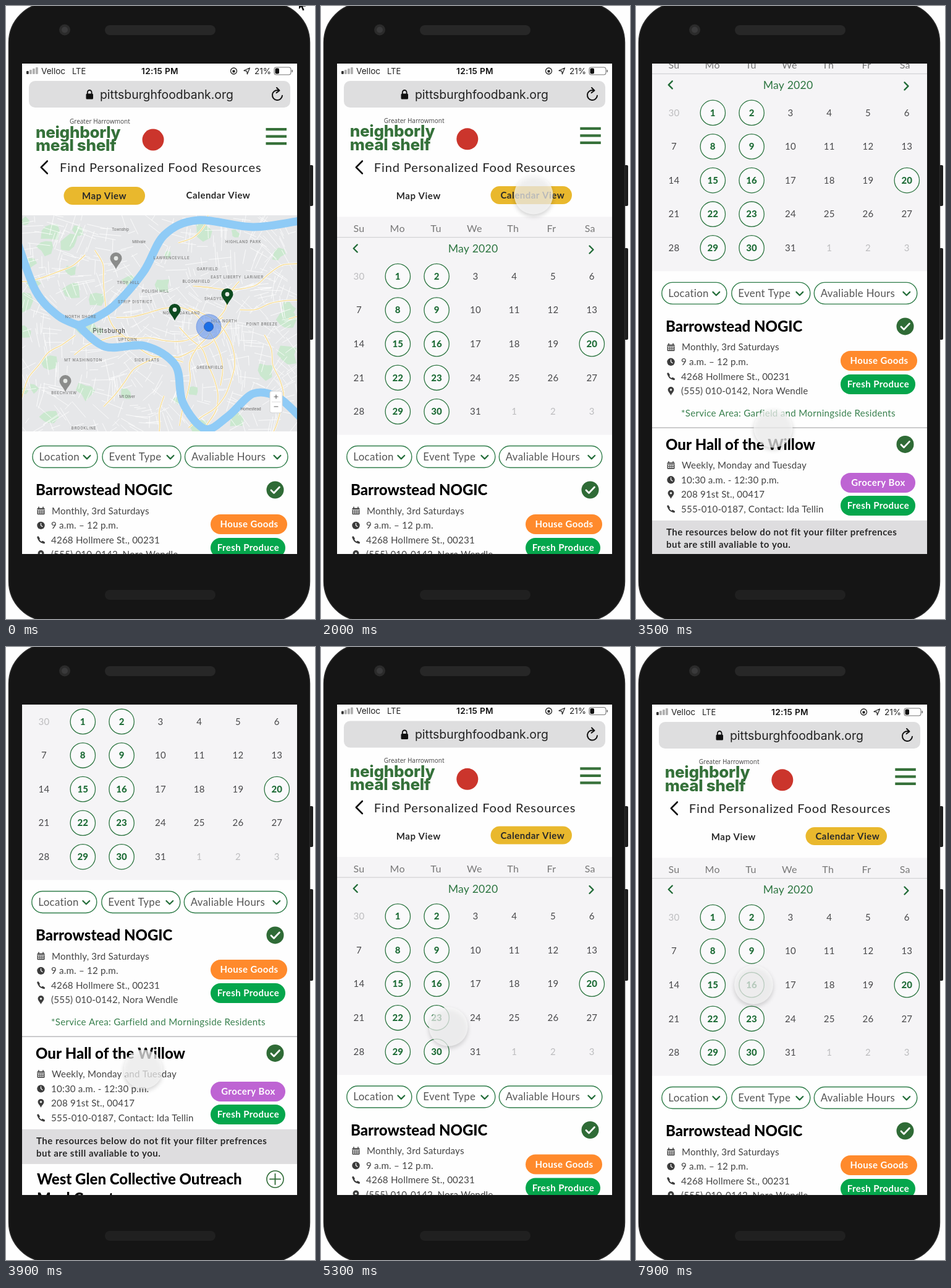
Write an HTML page with a canvas that moves like this. It is 500 by 990 pixels and loops after 8000 ms.

```html
<!DOCTYPE html>
<html lang="en">
<head>
<meta charset="utf-8">
<title>Food resources</title>
<style>
  html, body { margin: 0; width: 100%; height: 100%; overflow: hidden; background: #fff; }
  canvas { display: block; width: 500px; height: 990px; }
</style>
</head>
<body>
<canvas id="stage"></canvas>
<script>
const W = 500, H = 990, LOOP = 8000;
const LATO = 'Lato, "Open Sans", sans-serif', INTER = 'Inter, Roboto, sans-serif', MAP_FONT = 'Roboto, sans-serif';
const GREEN = '#2c7540', DARK = '#2f6b36', GOLD = '#e9b82d', INK = '#3c3c3c', FRESH = '#05a64c';
const dpr = window.devicePixelRatio || 1;

function prepare(canvas) {
  canvas.width = W * dpr;
  canvas.height = H * dpr;
  const ctx = canvas.getContext('2d');
  ctx.scale(dpr, dpr);
  return ctx;
}
const stageCtx = prepare(document.getElementById('stage'));
let c = stageCtx;

// ---------- helpers ----------
function text(s, x, y, size, o = {}) {
  c.font = `${o.w || 400} ${size}px ${o.f || LATO}`;
  c.letterSpacing = (o.ls || 0) + 'px';
  c.textAlign = o.a || 'left';
  c.fillStyle = o.c || '#333';
  c.fillText(s, x, y + size * 0.35);
}
function paint(fill, stroke, lw) {
  if (fill) { c.fillStyle = fill; c.fill(); }
  if (stroke) { c.strokeStyle = stroke; c.lineWidth = lw; c.stroke(); }
}
function box(x, y, w, h, r, fill, stroke, lw = 1.4) {
  c.beginPath();
  c.roundRect(x, y, w, h, r);
  paint(fill, stroke, lw);
}
function disc(x, y, r, fill, stroke, lw = 1.4) {
  c.beginPath();
  c.arc(x, y, r, 0, 7);
  paint(fill, stroke, lw);
}
function line(p, color, lw) {
  c.beginPath();
  for (let i = 0; i < p.length; i += 2) c.lineTo(p[i], p[i + 1]);
  c.lineCap = c.lineJoin = 'round';
  paint(null, color, lw);
}
function chevron(x, y, dx, dy, color, lw) {
  // tip at (x + dx, y + dy), arms at right angles to it
  line([x - dx - dy * 2, y - dy - dx * 2, x + dx, y + dy, x - dx + dy * 2, y - dy + dx * 2], color, lw);
}
function plus(x, y, r, color, lw) {
  line([x - r, y, x + r, y], color, lw);
  line([x, y - r, x, y + r], color, lw);
}
// smooth curve through every point
function spline(p, color, lw) {
  const n = p.length / 2, at = i => 2 * Math.max(0, Math.min(n - 1, i));
  c.beginPath();
  c.moveTo(p[0], p[1]);
  for (let i = 0; i < n - 1; i++) {
    const a = at(i - 1), b = at(i), d = at(i + 1), e = at(i + 2);
    c.bezierCurveTo(p[b] + (p[d] - p[a]) / 6, p[b + 1] + (p[d + 1] - p[a + 1]) / 6,
      p[d] - (p[e] - p[b]) / 6, p[d + 1] - (p[e + 1] - p[b + 1]) / 6, p[d], p[d + 1]);
  }
  paint(null, color, lw);
}
function random(seed) {
  return () => (seed = seed * 16807 % 2147483647) / 2147483647;
}
const clamp = u => Math.max(0, Math.min(1, u));
const phase = (t, from, to) => clamp((t - from) / (to - from));
const smooth = u => u * u * (3 - 2 * u);
const easeOut = u => 1 - (1 - u) * (1 - u);
const mix = (a, b, u) => a + (b - a) * u;

// ---------- map ----------
function pin(x, y, color, k = 1) {
  c.save();
  c.translate(x, y);
  c.scale(k, k);
  c.beginPath();
  c.moveTo(0, 14);
  c.bezierCurveTo(-3, 7, -9.5, 2, -9.5, -3.5);
  c.arc(0, -3.5, 9.5, Math.PI, 0);
  c.bezierCurveTo(9.5, 2, 3, 7, 0, 14);
  paint(color);
  disc(0, -3.5, 3.4, '#e6e9e6');
  c.restore();
}

function parks() {
  const rnd = random(41);
  for (let i = 0; i < 34; i++) {
    const x = 26 + 445 * rnd() ** 1.3, y = 338 + 349 * rnd(), r = 5 + 11 * rnd();
    c.beginPath();
    for (let a = 0; a < 6.2; a += 0.8) {
      const k = r * (0.6 + 0.7 * rnd());
      c.lineTo(x + Math.cos(a) * k, y + Math.sin(a) * k);
    }
    paint('#cbe8cf');
  }
}
function streets() {
  const rnd = random(17);
  c.beginPath();
  for (let i = 0; i < 620; i++) {
    const x = 26 + 445 * rnd(), y = 338 + 349 * rnd(), r = 5 + 14 * rnd();
    const a = Math.sin(x / 70) + Math.cos(y / 60) + (i % 2) * Math.PI / 2;
    c.moveTo(x - Math.cos(a) * r, y - Math.sin(a) * r);
    c.lineTo(x + Math.cos(a) * r, y + Math.sin(a) * r);
  }
  paint(null, 'rgba(255,255,255,.8)', 1);
}
function roads() {
  const rnd = random(23);
  for (let i = 0; i < 16; i++) {
    let x = 26 + 445 * rnd(), y = 338 + 349 * rnd(), a = 6.3 * rnd();
    const p = [];
    for (let k = 0; k < 11; k++) {
      p.push(x, y);
      a += rnd() - 0.5;
      x += 26 * Math.cos(a);
      y += 26 * Math.sin(a);
    }
    spline(p, '#fff', 3);
    spline(p, '#f6de9c', 1.6);
  }
}
const LABELS = [
  ['Township', 185, 361], ['Millvale', 215, 381], ['HIGHLAND PARK', 384, 381],
  ['LAWRENCEVILLE', 268, 407], ['GARFIELD', 326, 425], ['EAST LIBERTY  LARIMER', 374, 438],
  ['BLOOMFIELD', 308, 445], ['TROY HILL', 198, 447], ['POLISH HILL', 242, 461],
  ['STRIP DISTRICT', 209, 478], ['SHADYSIDE', 341, 473], ['NORTH OAKLAND', 284, 496],
  ['NORTH SHORE', 121, 502], ['UPTOWN', 197, 539], ['HILL NORTH', 353, 509],
  ['POINT BREEZE', 414, 514], ['MT WASHINGTON', 125, 572], ['SIDE FLATS', 228, 572],
  ['GREENFIELD', 330, 584], ['BEECHVIEW', 94, 625], ['Mt Oliver', 196, 631],
  ['BROOKLINE', 126, 682], ['Homestead', 396, 651]
];

function paintMap() {
  c.beginPath();
  c.rect(26, 338, 445, 349);
  c.clip();
  paint('#e6e7e9');
  parks();
  streets();
  roads();
  const water = '#8fcbf6';
  spline([480, 346, 400, 357, 310, 346, 256, 370, 222, 430, 170, 488, 118, 516], water, 13);
  spline([18, 380, 48, 460, 84, 500, 118, 516], water, 13);
  spline([114, 513, 160, 550, 225, 549, 274, 580, 286, 640, 322, 683, 360, 662, 400, 626, 440, 632, 480, 668], water, 13);
  for (const [s, x, y] of LABELS) {
    const caps = s === s.toUpperCase();
    text(s, x, y, 6.4, { f: MAP_FONT, a: 'center', ls: caps ? 0.7 : 0, c: '#6c6c6c' });
  }
  text('Pittsburgh', 167, 524, 10, { f: MAP_FONT, a: 'center', ls: 0.7, c: '#444' });
  pin(178, 411, '#8b8c8b');
  pin(96, 609, '#8b8c8b');
  pin(273, 494, '#0d4a20');
  pin(358, 469, '#0d4a20');
  disc(328, 518, 20, 'rgba(70,130,240,.5)', 'rgba(70,120,220,.5)', 1);
  disc(328, 518, 7.5, '#1a6fe6', '#3a5fb0', 1);
  box(427, 622, 20, 35, 3, '#fff', '#d4d4d4', 1);
  line([430, 639.5, 444, 639.5], '#ddd', 1);
  plus(437, 631, 3, '#666', 1.2);
  line([434, 647, 440, 647], '#666', 1.2);
}
const mapCanvas = document.createElement('canvas');
c = prepare(mapCanvas);
paintMap();
c = stageCtx;

// ---------- page parts ----------
function statusBar() {
  for (let i = 0; i < 4; i++)
    box(33 + i * 5, 105 - i * 2, 3.8, 5 + i * 2, 1, i ? '#b0b0b0' : '#333');
  const o = { f: INTER, c: '#222' };
  text('Velloc', 57, 105, 13.6, o);
  text('LTE', 107, 105, 13, o);
  text('12:15 PM', 249, 105, 13.6, { f: INTER, c: '#111', w: 600, a: 'center', ls: 0.3 });
  disc(368.5, 105, 5, null, '#222', 1.3);
  box(366.5, 103.4, 4, 4, 1, '#222');
  line([394.5, 100, 385, 104.3, 389.6, 105.2, 390.4, 110, 394.5, 100], '#222', 1.2);
  text('21%', 402, 105, 13.6, o);
  box(434, 99, 27, 12, 3.5, null, '#777', 1.1);
  box(435.5, 100.5, 6.5, 9, 2, '#111');
  box(462.3, 103, 1.8, 4, 1, '#777');
}
function addressBar() {
  box(37, 121, 423, 43, 10, '#dededf');
  box(129.5, 141.5, 11.5, 9, 1.5, '#111');
  box(131.8, 136, 6.8, 9, 3.4, null, '#111', 1.8);
  text('pittsburghfoodbank.org', 152, 143, 19.4, { f: INTER, c: '#222' });
  c.beginPath();
  c.arc(439, 144, 8, 0.1, 5);
  paint(null, '#111', 2);
  line([438, 132, 442.5, 136.4, 437.5, 140.2], '#111', 2);
}
function header(map) {
  const dx = map ? 0 : -1.2;
  c.save();
  c.translate(dx, dx);
  text('Greater Harrowmont', 103, 186.5, 10, { f: '"Open Sans", sans-serif', c: '#444' });
  const o = { f: INTER, w: 800, c: '#35713a', ls: -0.3 };
  text('neighborly', 48, 203.5, 26, o);
  text('meal shelf', 48, 225, 26, o);
  disc(238, 216, 17.5, '#cb352c');
  for (let i = 0; i < 3; i++) box(420.5, 197 + i * 11.5, 33.5, 4.2, 0, '#37713a');
  c.restore();
  chevron(61.8, 260.5, -5, 0, '#111', 2.6);
  text('Find Personalized Food Resources', 87 + dx, 261, 20, { ls: 0.9, c: '#222' });
  box(map ? 93.5 : 274.5, map ? 292 : 291, 131.5, 29, 14.5, GOLD);
  const tab = { w: 700, a: 'center', ls: 0.5, c: '#2a2a2a' };
  text('Map View', 159 + dx, 307, 15, tab);
  text('Calendar View', 343.5 + dx, 306, 15, tab);
}

const column = i => 61.5 + i * 62.8;
function calendar(open) {
  c.fillStyle = '#f5f4f6';
  c.fillRect(26, 340.5, 445, open ? 449 : 352);
  ['Su', 'Mo', 'Tu', 'We', 'Th', 'Fr', 'Sa'].forEach((d, i) =>
    text(d, 61.5 + i * 62.3, 359.5, 16, { a: 'center', c: '#777', ls: 0.4 }));
  c.fillStyle = '#d2d2d4';
  c.fillRect(26, 373, 445, 1.2);
  text('May 2020', 246, 392, 17.6, { a: 'center', c: GREEN, ls: 0.2 });
  chevron(55.7, 391.5, -3, 0, '#226c38', 2.4);
  chevron(437.5, 393.5, 3, 0, '#226c38', 2.4);
  for (let i = 0; i < 35; i++) {
    const col = i % 7, x = column(col), y = 436.5 + Math.floor(i / 7) * 54.6;
    const event = col === 1 || col === 2 || i === 20;
    const picked = open && i === 16, outside = i === 0 || i > 31;
    if (event) disc(x, y, 20.2, picked ? '#2a7a43' : '#faf9fb', GREEN, 1.3);
    text(String((i + 30) % 31 + (i ? 1 : 0)), x, y, 15, {
      a: 'center', w: event ? 800 : 400, ls: 0.2,
      c: picked ? '#fff' : event ? '#1c6b35' : outside ? '#bdbdbf' : '#4a4a4c'
    });
  }
  if (!open) return;
  text('Events on May 16, 2020', 52, 698, 17, { c: '#111', ls: 0.5 });
  ['Barrowstead NOGIC 9AM - 12PM', 'Our Hall of the Willow 10:30AM - 12:30PM'].forEach((s, i) => {
    const y = 733.5 + i * 28.4;
    disc(58, y, 6, '#edb62b');
    text(s, 77, y, 14.6, { c: '#444', ls: 0.1 });
  });
}

function filter(s, x, w) {
  box(x, 710.5, w, 35, 17.5, '#fff', '#2f7d49');
  text(s, x + 10.5, 728, 16.8, { c: '#555', ls: 0.35 });
  chevron(x + w - 17, 728.7, 0, 2.7, '#226c38', 2.2);
}
function filters() {
  filter('Location', 43, 105);
  filter('Event Type', 156, 127);
  filter('Avaliable Hours', 289.5, 166.5);
}

const ICONS = {
  cal(y) {
    box(50.5, y - 4.5, 12, 10.5, 1, '#4a4a4a');
    for (const x of [53, 60]) line([x, y - 6, x, y - 4], '#4a4a4a', 1.6);
    c.fillStyle = '#fff';
    for (let i = 0; i < 6; i++) c.fillRect(52 + i % 3 * 3.3, y - 0.6 + (i > 2 ? 3 : 0), 2.2, 1.8);
    c.fillRect(51, y - 2.3, 11, 0.8);
  },
  clock(y) {
    disc(56.5, y, 6.2, INK);
    line([56.5, y - 3.6, 56.5, y, 59, y + 1.8], '#fff', 1.2);
  },
  phone(y) {
    c.beginPath();
    c.moveTo(52, y - 4);
    c.quadraticCurveTo(53, y + 3.5, 61, y + 4.5);
    paint(null, INK, 2);
    line([51.8, y - 4.5, 53.2, y - 2.2], INK, 3.2);
    line([59.2, y + 3, 61.4, y + 4.2], INK, 3.2);
  },
  pin(y) { pin(56.5, y - 0.3, INK, 0.52); }
};
function tag(s, y, w, color) {
  box(331, y, w, 32, 16, color);
  text(s, 331.5 + w / 2, y + 16, 15, { w: 700, a: 'center', c: '#fff', ls: 0.4 });
}
function place(y, name, rows) {
  text(name, 48, y, 24, { w: 800, c: '#000' });
  disc(435.5, y - 0.5, 14, DARK);
  line([429, y, 433.5, y + 4.5, 442.5, y - 5], '#fff', 2.8);
  rows.forEach(([icon, s], i) => {
    const ry = y + 33.3 + i * 23.6;
    ICONS[icon](ry);
    text(s, i ? 73 : 74, ry, 15.1, { c: '#444', ls: 0.2 });
  });
}
function list() {
  place(782, 'Barrowstead NOGIC', [
    ['cal', 'Monthly, 3rd Saturdays'], ['clock', '9 a.m. – 12 p.m.'],
    ['phone', '4268 Hollmere St., 00231'], ['pin', '(555) 010-0142, Nora Wendle']
  ]);
  tag('House Goods', 821, 124, '#ff8a2c');
  tag('Fresh Produce', 859, 121, FRESH);
  text('*Service Area: Garfield and Morningside Residents', 73, 922, 15.1, { c: '#39804e', ls: 0.3 });
  c.fillStyle = '#bcbcbe';
  c.fillRect(26, 944.5, 445, 1.5);

  place(972.5, 'Our Hall of the Willow', [
    ['cal', 'Weekly, Monday and Tuesday'], ['clock', '10:30 a.m. - 12:30 p.m.'],
    ['pin', '208 91st St., 00417'], ['phone', '555-010-0187, Contact: Ida Tellin']
  ]);
  tag('Grocery Box', 1018, 121, '#be64d3');
  tag('Fresh Produce', 1055, 121, FRESH);
  c.fillStyle = '#dedddf';
  c.fillRect(26, 1095, 445, 56);
  const o = { w: 700, c: '#2a2a2a', ls: 0.5 };
  text('The resources below do not fit your filter prefrences', 49, 1114, 15, o);
  text('but are still avaliable to you.', 49, 1134, 15, o);

  text('West Glen Collective Outreach', 50, 1176, 24, { w: 800, c: '#000' });
  text('Meal Counter', 50, 1207, 24, { w: 800, c: '#000' });
  disc(435.5, 1175.5, 13.5, '#fff', DARK, 1.6);
  plus(435.5, 1175.5, 8.5, DARK, 1.8);
}

function phone() {
  c.fillStyle = '#fefefe';
  c.fillRect(0, 0, W, H);
  box(488, 257, 9, 66, 2, '#1d1d1d');
  box(488, 391, 9, 148, 2, '#1d1d1d');
  box(4.5, -5, 487, 998, 64, '#151515', '#2b2b2b', 1.5);
  disc(95, 38.5, 9, '#2b2b2b');
  disc(95, 38.5, 5, '#3a3a3b');
  box(160, 31, 179, 16, 8, '#272727');
  box(160, 943, 179, 16, 8, '#202020');
}

// an arrow outside the phone's screen, a round touch mark on it
function pointer(x, y) {
  c.save();
  c.translate(x, y);
  if (x > 26 && x < 471 && y > 93 && y < 885) {
    c.shadowColor = 'rgba(0,0,0,.24)';
    c.shadowBlur = 7 * dpr;
    c.shadowOffsetY = 3.5 * dpr;
    disc(0, 0, 31.5, 'rgba(250,250,250,.7)');
  } else {
    line([0, 0, 0, 16, 3.7, 12.6, 6.2, 18.5, 8.6, 17.5, 6.2, 11.8, 11.2, 11.8, 0, 0], '#fff', 2.4);
    paint('#111');
  }
  c.restore();
}

// ---------- timeline ----------
const TAP_CALENDAR = 1500, OPEN_DAY = 5900, CLOSE_DAY = 7500;
const STOPS = [[474, -11], [344, 305], [222, 682], [190.5, 545.5]];
const MOVES = [[0, 900], [2050, 2450], [5100, 5500]];

function pointerAt(t) {
  let p = STOPS[0];
  MOVES.forEach(([from, to], i) => {
    const u = smooth(phase(t, from, to));
    p = p.map((v, k) => mix(v, STOPS[i + 1][k], u));
  });
  return p;
}
function scrollAt(t) {
  if (t >= CLOSE_DAY) return 0;
  const down = 338 * easeOut(phase(t, 2500, 4380));
  return mix(down, 1.5, smooth(phase(t, 4550, 5100)));
}

function draw(t) {
  const map = t < TAP_CALENDAR;
  const open = t >= OPEN_DAY && t < CLOSE_DAY;
  phone();
  c.save();
  c.beginPath();
  c.rect(26, 93, 445, 792);
  c.clip();
  paint('#fefefe');
  c.translate(0, -scrollAt(t));
  statusBar();
  addressBar();
  header(map);
  if (map) c.drawImage(mapCanvas, 0, 0, W, H);
  else calendar(open);
  if (open) c.translate(0, 96);
  c.save();
  if (!map) c.translate(-1.2, 0);
  filters();
  c.restore();
  list();
  c.restore();
  pointer(...pointerAt(t));
}

const start = performance.now();
function tick() {
  draw((performance.now() - start) % LOOP);
  requestAnimationFrame(tick);
}
tick();
</script>
</body>
</html>
```
